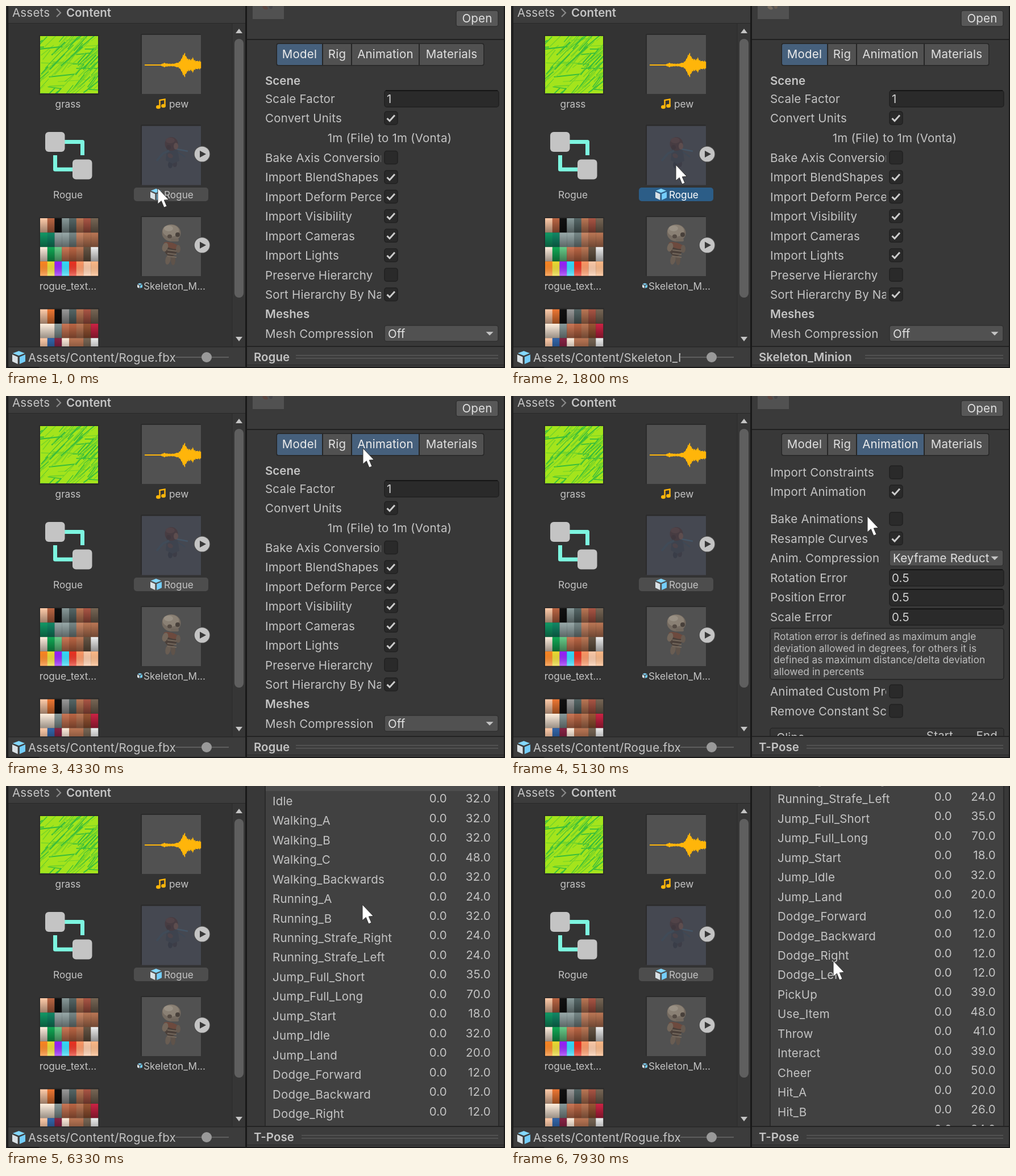
An HTML page with a canvas for the animation above (8000 ms loop, 878 by 638 pixels).

```html
<!DOCTYPE html>
<html lang="en">
<head>
<meta charset="utf-8">
<title>Asset import settings</title>
<style>
html, body { margin: 0; width: 100%; height: 100%; overflow: hidden; background: #191919; }
canvas { display: block; }
</style>
</head>
<body>
<canvas id="stage" width="878" height="638"></canvas>
<script>
const g = document.getElementById('stage').getContext('2d');
const LOOP = 8000, FPMS = 0.015, WHEEL = 93, ROW = 34.45;
const INK = '#c4c4c4', BRIGHT = '#e0e0e0', BLUE = '#2c5d87', PANEL = '#383838';

// Cursor path: time, x, y
const PATH = [
  [0, 267, 321], [133, 270, 304], [533, 270, 304], [1067, 302, 402], [1200, 302, 402],
  [1400, 298, 296], [1533, 290, 280], [1933, 290, 280], [2333, 806, 72], [2533, 628, 97],
  [2733, 626, 94], [2800, 626, 94], [3067, 451, 82], [3333, 600, 68], [3600, 679, 92],
  [3667, 679, 90], [3867, 478, 75], [4067, 628, 89], [4200, 628, 89], [4333, 628, 92],
  [4600, 628, 92], [5133, 627, 212], [5267, 627, 212], [5333, 627, 213], [6200, 627, 213],
  [6267, 627, 209], [7267, 627, 209], [7933, 567, 308]
];
const WHEEL_TIMES = [5600, 5667, 5733, 5800, 5933, 6200, 6333, 6933, 7200, 7267];

const TABS = [['Model', 477, 556], ['Rig', 558, 607], ['Animation', 609, 726], ['Materials', 728, 840]];
const MODEL_CHECKS = [
  ['Bake Axis Conversion', 0], ['Import BlendShapes', 1], ['Import Deform Percent', 1],
  ['Import Visibility', 1], ['Import Cameras', 1], ['Import Lights', 1],
  ['Preserve Hierarchy', 0], ['Sort Hierarchy By Name', 1]
];
const HELP = [
  'Rotation error is defined as maximum angle', 'deviation allowed in degrees, for others it is',
  'defined as maximum distance/delta deviation', 'allowed in percents'
];
const CLIPS = ('T-Pose 1,Idle 32,Walking_A 32,Walking_B 32,Walking_C 48,Walking_Backwards 32,Running_A 24,' +
  'Running_B 32,Running_Strafe_Right 24,Running_Strafe_Left 24,Jump_Full_Short 35,Jump_Full_Long 70,' +
  'Jump_Start 18,Jump_Idle 32,Jump_Land 20,Dodge_Forward 12,Dodge_Backward 12,Dodge_Right 12,' +
  'Dodge_Left 12,PickUp 39,Use_Item 48,Throw 41,Interact 39,Cheer 50,Hit_A 20,Hit_B 26,Death_A 34'
).split(',').map(s => s.split(' '));
const SWATCHES = [
  ['fca b64 111 899 566 b75 a54 765', '196 186 9aa 9aa 788 c86 b75 b75',
   'fed 1a5 6c8 c75 b64 b75 654 eee', 'f82 ed3 92f 3df e32 f96 fca fb8'],
  ['fca e73 111 999 566 b75 a54 765', 'fed fed 899 c75 b64 b75 953 c24',
   'fca 36a 824 fed b75 b75 765 eee']
];

function rng(seed) {
  return () => (seed = (seed * 16807) % 2147483647) / 2147483647;
}
function rect(x, y, w, h, fill, r = 0, stroke) {
  g.beginPath();
  g.roundRect(x, y, w, h, r);
  g.fillStyle = fill;
  g.fill();
  if (stroke) { g.strokeStyle = stroke; g.lineWidth = 1.5; g.stroke(); }
}
function poly(points, fill) {
  g.beginPath();
  for (const [x, y] of points) g.lineTo(x, y);
  g.closePath();
  g.fillStyle = fill;
  g.fill();
}
function line(points, color, width) {
  g.beginPath();
  for (const [x, y] of points) g.lineTo(x, y);
  g.strokeStyle = color;
  g.lineWidth = width;
  g.stroke();
}
function blob(x, y, rx, ry, fill, turn = 0) {
  g.beginPath();
  g.ellipse(x, y, rx, ry, turn, 0, 7);
  g.fillStyle = fill;
  g.fill();
}
function text(s, x, y, { size = 20.5, bold = 0, align = 'left', color = INK } = {}) {
  g.font = `${bold ? 600 : 400} ${size}px Inter, sans-serif`;
  g.letterSpacing = size > 20 && !bold ? '0.2px' : '0px';
  g.textAlign = align;
  g.fillStyle = color;
  g.fillText(s, x, y + size * 0.36);
}
function clipped(x, y, w, h, draw) {
  g.save();
  g.beginPath();
  g.rect(x, y, w, h);
  g.clip();
  draw();
  g.restore();
}
function triangle(x, y, w, h, fill = INK) {
  poly([[x - w, y - h], [x + w, y - h], [x, y + h]], fill);
}
function cube(x, y, s) {
  const at = list => list.map(([a, b]) => [x + a * s, y + b * s]);
  poly(at([[.04, .17], [.5, 0], [.96, .17], [.5, .36]]), '#84d8ff');
  poly(at([[0, .27], [.42, .46], [.42, 1], [0, .8]]), '#d8e0e4');
  poly(at([[1, .27], [.56, .46], [.56, 1], [1, .8]]), '#74cdfb');
}

// Thumbnails
function grass() {
  const rand = rng(77);
  rect(60, 53, 102, 101, '#a4e41c');
  clipped(60, 53, 102, 101, () => {
    for (let i = 0; i < 110; i++) {
      const x = 45 + rand() * 110, y = 60 + rand() * 105, len = 15 + rand() * 38;
      const a = i % 6 ? -0.95 + rand() * 0.3 : -0.15 + rand() * 0.3;
      line([[x, y], [x + Math.cos(a) * len, y + Math.sin(a) * len]],
        rand() < 0.45 ? '#38bd3c' : '#74d328', 0.8 + rand() * 1.4);
    }
  });
}
function wave() {
  const rand = rng(9), peak = (x, c, w, h) => h * Math.exp(-Math.abs(x - c) / w);
  rect(239, 51, 104, 104, '#515151');
  for (let x = 244; x < 343; x++) {
    const loud = x > 272;
    const amp = loud ? 2 + peak(x, 279, 4, 2) + peak(x, 313, 5, 21) + peak(x, 328, 6, 11) + peak(x, 340, 5, 4) : 0.9;
    const h = amp * (loud ? 0.75 + rand() * 0.35 : 1);
    rect(x, 104 - h, 1.2, h * 2, '#ffb50a');
  }
}
function palette(y, rows) {
  rows.forEach((row, j) => {
    const top = y + j * 25.4;
    row.split(' ').forEach((c, i) => rect(60 + i * 12.75, top, 13, 25.4, '#' + c));
    const shade = g.createLinearGradient(0, top, 0, top + 25.4);
    shade.addColorStop(0, '#0000');
    shade.addColorStop(1, j === 3 ? '#fff5' : '#0006');
    rect(60, top, 102, 25.4, shade);
  });
}
function graphIcon() {
  g.lineJoin = 'round';
  line([[103, 239.5], [134.5, 239.5], [134.5, 263]], '#7df5e0', 7);
  line([[86.5, 263], [86.5, 288], [118, 288]], '#7df5e0', 7);
  g.lineJoin = 'miter';
  rect(69, 222, 34.5, 35, INK, 6);
  rect(117, 270.5, 34.5, 35, INK, 6);
}
function rogue() {
  blob(289, 280, 4, 6, '#3f4043');
  blob(297, 278, 4, 6, '#454042');
  poly([[283, 252], [302, 252], [305, 273], [293, 278], [281, 272]], '#46494c');
  line([[265, 273], [276, 260], [287, 255]], '#4a565c', 4);
  line([[300, 252], [320, 256]], '#506570', 2.5);
  line([[302, 257], [315, 266]], '#465259', 2);
  blob(289, 264, 5, 4, '#5c4b46', 0.5);
  blob(291, 243, 11.5, 12, '#553f3a');
  blob(289, 237, 8, 5, '#644a43');
  blob(299, 247, 4, 6, '#76594d');
  blob(286, 249, 4, 4, '#4a3835');
}
function skeleton() {
  blob(285, 447, 4.5, 9, '#695d53', 0.2);
  blob(294, 448, 4, 9, '#5f534a');
  blob(290, 429, 11, 12, '#4b403a');
  blob(291, 422, 14, 5, '#6d4a3e', 0.3);
  blob(280, 425, 5, 8, '#74675b', 0.3);
  blob(303, 428, 4, 7, '#665a50');
  for (const y of [430, 436, 441]) line([[284, y], [300, y + 2]], '#75695d', 1.8);
  blob(291, 400, 16.5, 15, '#756b61');
  blob(290, 396, 14.5, 10.5, '#8a8074');
  blob(286, 392, 8, 5, '#999084');
  blob(302, 403, 4, 4, '#48403b');
  blob(288, 406, 4, 3.5, '#554b44');
  rect(290, 410, 14, 5, '#70665c', 2);
}
function modelThumb(y, draw, selected) {
  rect(239, y, 104, 104, '#515151');
  draw();
  if (selected) rect(239, y, 104, 104, 'rgba(48,56,80,.35)');
  blob(345, y + 49.5, 14.5, 14.5, '#4a4a4a');
  blob(345, y + 49.5, 13.3, 13.3, INK);
  poly([[341, y + 43.5], [341, y + 55.5], [352, y + 49.5]], '#383838');
}
function pill(y, focused) {
  rect(225, y, 131, 24, focused ? BLUE : '#4d4d4d', 5);
}

function browser(T) {
  const skeletonOn = T >= 1195 && T < 1795;
  const focused = T >= 330 && T < 4262;
  const small = { size: 17.2 }, mid = { size: 17.2, align: 'center' };
  rect(4, 0, 417, 636, '#333');
  rect(4, 0, 417, 30, '#3c3c3c');
  rect(4, 30, 417, 1, '#282828');
  text('Assets', 11, 12);
  line([[89, 5], [96, 12], [89, 19]], '#8a8a8a', 2.2);
  text('Content', 106, 12, { bold: 1 });

  rect(398, 31, 23, 569, '#363636');
  rect(397.5, 31, 1, 569, '#2a2a2a');
  rect(402, 58, 16, 456, '#5f5f5f', 8);
  triangle(410, 44, 6, -4);
  triangle(410, 587, 6, 4);

  for (const [x, y] of [[59, 52], [238, 50], [238, 210], [59, 373], [238, 371], [59, 533]])
    rect(x - 1, y - 1, 106, 106, '#2b2b2b', 2);
  grass();
  text('grass', 109, 173, mid);
  wave();
  blob(268, 178, 4, 3.2, '#ffb50a');
  blob(277, 176, 4, 3.2, '#ffb50a');
  line([[270.5, 178], [270.5, 166], [279.5, 164.5], [279.5, 176]], '#ffb50a', 2.5);
  text('pew', 287, 173, small);
  graphIcon();
  text('Rogue', 109, 333, mid);

  modelThumb(211.5, rogue, !skeletonOn);
  if (!skeletonOn) pill(320, focused);
  cube(254, 322, 20);
  text('Rogue', 278, 333, { size: 17.2, color: focused && !skeletonOn ? '#fff' : INK });
  palette(374, SWATCHES[0]);
  text('rogue_text...', 109, 494, mid);
  modelThumb(372, skeleton, skeletonOn);
  if (skeletonOn) pill(481, true);
  cube(231, 488.5, 9);
  text('Skeleton_M...', 242, 494, { size: 17.2, color: skeletonOn ? '#fff' : INK });
  clipped(4, 500, 394, 100, () => palette(534.5, SWATCHES[1]));

  rect(4, 600, 417, 36, '#3c3c3c');
  rect(4, 600, 417, 1.5, '#282828');
  cube(11, 608, 23);
  const name = T >= 1462 && T < 1995 ? 'Skeleton_Minion' : 'Rogue';
  clipped(30, 602, 268, 34, () => text(`Assets/Content/${name}.fbx`, 39, 620));
  rect(298, 618, 94, 2, '#5e5e5e');
  blob(353, 619, 9, 9, '#999');
}

// Inspector controls
function label(s, y) {
  clipped(450, y - 18, 210, 36, () => text(s, 456, y));
}
function field(s, y, value) {
  label(s, y);
  rect(666, y - 14.5, 201, 29, '#2a2a2a', 4, '#202020');
  rect(668, y - 15, 197, 1.5, '#101010');
  text(value, 670, y, { color: '#d2d2d2' });
}
function check(s, y, on) {
  label(s, y);
  rect(666, y - 12, 23, 23, '#2a2a2a', 4, '#212121');
  if (on) line([[670.5, y], [675, y + 4.5], [684, y - 5.5]], '#ccc', 3);
}
function dropdown(s, y, value) {
  label(s, y);
  rect(666, y - 14.5, 200, 28, '#515151', 4, '#303030');
  clipped(666, y - 15, 176, 30, () => text(value, 672, y, { color: BRIGHT }));
  triangle(851, y, 6.5, 3.2);
}
function header(T, mouse, skeletonShown) {
  rect(424, 0, 452, 59, '#3a3a3a');
  rect(434, 0, 55, 23, '#515151');
  blob(456, 3, 5, 3, skeletonShown ? '#756b61' : '#5a4540', 0.4);
  blob(466, 1, 3, 4, skeletonShown ? '#695d53' : '#454549');
  rect(792, 8, 74, 28, '#585858', 4, '#303030');
  text('Open', 829, 22, { align: 'center', color: BRIGHT });
  rect(424, 58, 452, 2, '#202020');
  rect(475.5, 65.5, 366, 40, '#262626', 4);
  TABS.forEach(([name, a, b], i) => {
    const on = i === 0 ? T < 4462 : i === 2 && T >= 4262;
    const over = mouse[1] > 66 && mouse[1] < 105 && mouse[0] >= a && mouse[0] <= b;
    rect(a, 67, b - a, 37, on ? '#46607c' : over ? '#5e5e5e' : '#515151',
      i === 0 ? [3, 0, 0, 3] : i === 3 ? [0, 3, 3, 0] : 0);
    text(name, (a + b) / 2, 85, { align: 'center', color: on || over ? '#ececec' : BRIGHT });
  });
}
function modelPage() {
  text('Scene', 456, 132, { bold: 1 });
  field('Scale Factor', 163.5, '1');
  check('Convert Units', 198, 1);
  text('1m (File) to 1m (Vonta)', 675, 233, { align: 'center' });
  MODEL_CHECKS.forEach(([s, on], i) => check(s, 267.5 + i * ROW, on));
  text('Meshes', 456, 543, { bold: 1 });
  dropdown('Mesh Compression', 577.5, 'Off');
}
function animationPage() {
  check('Import Constraints', 135, 0);
  check('Import Animation', 169, 1);
  check('Bake Animations', 217, 0);
  check('Resample Curves', 251.5, 1);
  dropdown('Anim. Compression', 286, 'Keyframe Reduction');
  ['Rotation', 'Position', 'Scale'].forEach((s, i) => field(s + ' Error', 320.5 + i * ROW, '0.5'));
  rect(456, 409.5, 411, 90, '#404040', 4, '#232323');
  HELP.forEach((s, i) => text(s, 462, 424 + i * 20.6, { size: 17.4, color: '#bdbdbd' }));
  check('Animated Custom Properties', 521, 0);
  check('Remove Constant Scale Curves', 555.5, 0);

  const top = 585.5, height = 41 + CLIPS.length * ROW;
  rect(456, top, 411, height, '#414141', 4, '#242424');
  rect(457, top + 1, 409, 32, '#353535', [4, 4, 0, 0]);
  rect(457, top + 32, 409, 1.5, '#242424');
  text('Clips', 467, 601.5);
  text('Start', 778, 598.5, { align: 'right' });
  text('End', 856, 598.5, { align: 'right' });
  rect(457, 625.5, 409, ROW, '#4d4d4d');
  CLIPS.forEach(([name, end], i) => {
    const y = 643 + i * ROW;
    text(name, 469, y);
    text('0.0', 776, y - 4.5, { align: 'right' });
    text(end + '.0', 853, y - 4.5, { align: 'right' });
  });
}
function inspector(T, mouse) {
  const skeletonShown = T >= 1462 && T < 1995, animation = T >= 4462;
  const scroll = WHEEL * WHEEL_TIMES.filter(w => w <= T + 3).length;
  rect(424, 0, 452, 636, PANEL);
  clipped(424, 0, 452, 599, () => {
    g.translate(0, -scroll);
    header(T, [mouse[0], mouse[1] + scroll], skeletonShown);
    animation ? animationPage() : modelPage();
  });
  const [title, grip] = animation ? ['T-Pose', 520] : skeletonShown ? ['Skeleton_Minion', 623] : ['Rogue', 510];
  rect(424, 599, 452, 37, '#3c3c3c');
  rect(424, 599, 452, 2, '#232323');
  rect(424, 632, 452, 1.5, '#2a2a2a');
  text(title, 436, 619, { bold: 1 });
  for (const y of [615, 620]) rect(grip, y, 866 - grip, 1.5, '#585858');
}

function mouseAt(T) {
  const i = PATH.findIndex(p => p[0] > T);
  if (i < 0) return PATH[PATH.length - 1].slice(1);
  const [t0, x0, y0] = PATH[i - 1], [t1, x1, y1] = PATH[i];
  const p = (T - t0) / (t1 - t0), e = p * p * (3 - 2 * p);
  return [x0 + (x1 - x0) * e, y0 + (y1 - y0) * e];
}
function arrow([x, y]) {
  poly([[0, 0], [0, 28], [6.3, 22.5], [11, 34], [16, 32], [11.3, 21], [19.5, 20.5]]
    .map(([a, b]) => [x + a, y + b]), '#fff');
  g.strokeStyle = '#333';
  g.lineWidth = 1;
  g.stroke();
}

function draw(now) {
  const T = Math.floor(((now % LOOP) + 4) * FPMS) / FPMS;
  const mouse = mouseAt(T);
  rect(0, 0, 878, 638, '#191919');
  rect(0, 0, 2, 638, '#2c2c2c');
  browser(T);
  inspector(T, mouse);
  arrow(mouse);
}
let start;
function tick(now) {
  start ??= now;
  draw(now - start);
  requestAnimationFrame(tick);
}
requestAnimationFrame(tick);
</script>
</body>
</html>
```
